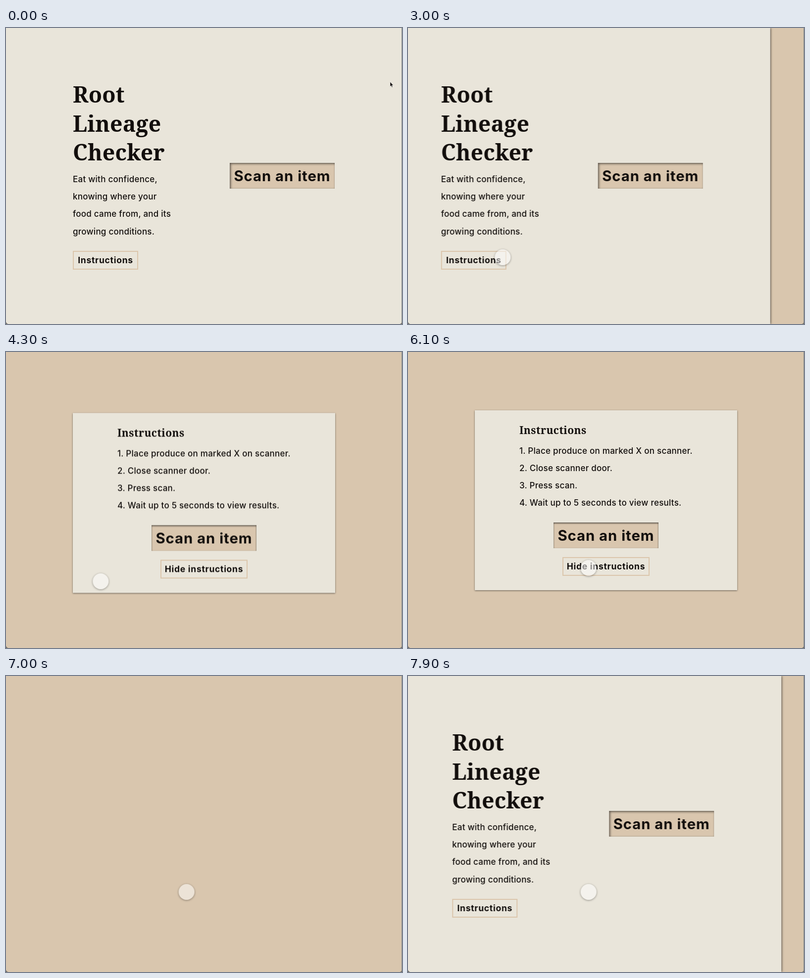
Recreate the animation shown at these times as an HTML page. Size 800 by 599 pixels, loop 8000 ms.

```html
<!DOCTYPE html>
<html lang="en">
<head>
<meta charset="utf-8">
<title>Produce scanner</title>
<style>
  :root { --cream: #e9e5da; --tan: #d9c6ae; --ink: #120e0c; }
  html, body { margin: 0; width: 100%; height: 100%; overflow: hidden; background: var(--tan); }
  .stage { position: relative; width: 800px; height: 599px; overflow: hidden; background: var(--tan); }
  .stage div, svg { position: absolute; }
  svg { left: 0; top: 0; overflow: visible; fill: var(--ink); }

  .page, .sheet, .dot, .arrow { animation: 8s linear infinite; }
  .page {
    inset: 0; background: var(--cream);
    box-shadow: 1px 0 4px rgba(0, 0, 0, .65);
    animation-name: page;
  }
  .sheet {
    left: 135px; top: 118px; width: 529.5px; height: 364px;
    background: var(--cream);
    box-shadow: 0 1px 3px rgba(0, 0, 0, .55);
    animation-name: sheet;
  }
  .scan { width: 212px; height: 52px; background: var(--tan); }
  .page .scan { left: 452px; top: 273.4px; box-shadow: inset 2px 2px 4px rgba(0, 0, 0, .55), inset 0 0 2px rgba(0, 0, 0, .25); }
  .sheet .scan { left: 159px; top: 227px; box-shadow: inset 0 2px 3px rgba(0, 0, 0, .55), inset 0 0 2px rgba(0, 0, 0, .2); }
  .ghost { box-sizing: border-box; height: 38px; border: 2px solid #dbc6ac; }
  .page .ghost { left: 135px; top: 451px; width: 132px; }
  .sheet .ghost { left: 177px; top: 297px; width: 176px; }

  text { font: 500 17px Inter, "Open Sans", sans-serif; letter-spacing: .25px; }
  .title { font: 600 44.5px "Noto Serif", serif; letter-spacing: .2px; }
  .head { font: 700 21px "Noto Serif", serif; letter-spacing: .45px; }
  .big { font-size: 29.3px; font-weight: 700; letter-spacing: .95px; text-anchor: middle; }
  .label { font-size: 17.5px; font-weight: 700; letter-spacing: .72px; text-anchor: middle; }

  .dot {
    left: -16px; top: -16px; width: 32px; height: 32px; border-radius: 50%;
    background: rgba(255, 255, 255, .5);
    box-shadow: 0 1px 4px rgba(0, 0, 0, .38);
    animation-name: dot;
  }
  .arrow { animation-name: arrow; }
  .frame { inset: 0 0 0 auto; width: 1px; background: #858b8b; }
  .corner {
    left: 0; bottom: 0; width: 5px; height: 5px;
    background: radial-gradient(circle at 100% 0, transparent 4.5px, #6b6862 5.2px);
  }
  .corner.right { left: auto; right: 0; transform: scaleX(-1); }

  @keyframes page {
    0%, 36.24% { transform: none; animation-timing-function: ease-in-out; }
    42.49%, 93.56% { transform: translateX(-806px); animation-timing-function: ease-in-out; }
    99.81%, 100% { transform: none; }
  }
  @keyframes sheet {
    0%, 48.025% { transform: translateY(610px); animation-timing-function: cubic-bezier(.25, 1, .5, 1); }
    56%, 78.125% { transform: none; animation-timing-function: cubic-bezier(.32, 0, .67, 0); }
    87.125%, 100% { transform: translateY(610px); }
  }
  @keyframes dot {
    0%, 18.74% { opacity: 0; transform: translate(776px, 113px); }
    18.75% { opacity: 1; transform: translate(776px, 113px); animation-timing-function: ease-in-out; }
    32.5%, 67% { opacity: 1; transform: translate(191.3px, 464px); animation-timing-function: ease-in-out; }
    72.5% { opacity: 1; transform: translate(447px, 386px); animation-timing-function: ease-in-out; }
    76.25%, 100% { opacity: 1; transform: translate(364.7px, 437px); }
  }
  @keyframes arrow {
    0%, 18.74% { opacity: 1; }
    18.75%, 100% { opacity: 0; }
  }
</style>
</head>
<body>
<div class="stage">
  <div class="sheet">
    <div class="scan"></div>
    <div class="ghost"></div>
    <svg width="529" height="364">
      <text class="head" x="90" y="48">Instructions</text>
      <text x="90" y="87.5">1. Place produce on marked X on scanner.</text>
      <text x="90" y="122.7">2. Close scanner door.</text>
      <text x="90" y="157.9">3. Press scan.</text>
      <text x="90" y="193">4. Wait up to 5 seconds to view results.</text>
      <text class="big" x="265" y="263.5">Scan an item</text>
      <text class="label" x="265" y="322.3">Hide instructions</text>
    </svg>
  </div>

  <div class="page">
    <div class="scan"></div>
    <div class="ghost"></div>
    <svg width="800" height="599">
      <text class="title" x="135" y="151">Root</text>
      <text class="title" x="135" y="209.5">Lineage</text>
      <text class="title" x="135" y="268">Checker</text>
      <text x="135" y="312">Eat with confidence,</text>
      <text x="135" y="347.2">knowing where your</text>
      <text x="135" y="382.3">food came from, and its</text>
      <text x="135" y="417.5">growing conditions.</text>
      <text class="label" x="201" y="476.3">Instructions</text>
      <text class="big" x="558" y="310">Scan an item</text>
    </svg>
  </div>

  <svg class="arrow" width="800" height="599">
    <path d="M776 109v9.5l2.1-1.9 1.5 3.5 1.5-.7-1.5-3.3h2.8z" stroke="#fff" stroke-width=".5"/>
  </svg>
  <div class="dot"></div>
  <div class="frame"></div>
  <div class="corner"></div>
  <div class="corner right"></div>
</div>
</body>
</html>
```
